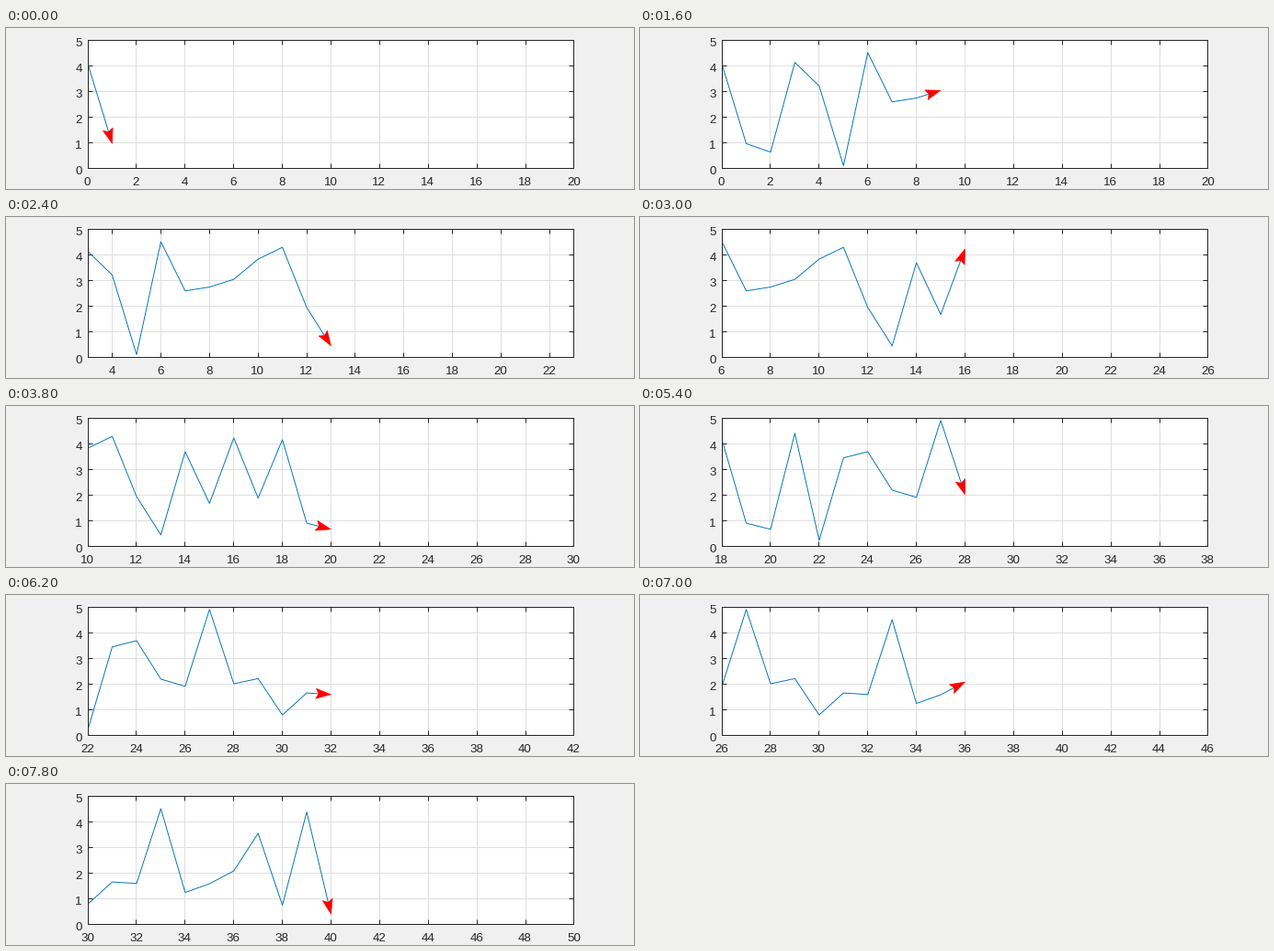
A matplotlib script that plays this animation: 683 px wide and 176 px high, repeating every 8000 ms.

```python
import numpy as np
import matplotlib.pyplot as plt
from matplotlib.animation import FuncAnimation
from matplotlib.patches import Polygon
from matplotlib.ticker import MultipleLocator
from matplotlib.transforms import IdentityTransform, ScaledTranslation

W, H, DPI = 683, 176, 100
PT = 72 / DPI                      # points per pixel
SPAN, LAG = 20, 10                 # window width, samples kept behind the tip
HEAD_LEN, HEAD_HALF, NOTCH = 16.5, 5.6, 3
INK = "#262626"

# vertices of the plotted signal, one per unit of x
signal = np.array([
    4.05, 0.95, 0.62, 4.12, 3.20, 0.09, 4.50, 2.58, 2.73, 3.03,
    3.82, 4.28, 1.93, 0.43, 3.68, 1.66, 4.22, 1.87, 4.15, 0.89,
    0.65, 4.40, 0.22, 3.44, 3.68, 2.18, 1.90, 4.90, 2.00, 2.20,
    0.78, 1.64, 1.58, 4.50, 1.23, 1.57, 2.07, 3.54, 0.73, 4.37,
    0.38])

plt.rcParams["font.family"] = "Liberation Sans"
plt.rcParams["toolbar"] = "None"

fig = plt.figure(figsize=(W / DPI, H / DPI), dpi=DPI, facecolor="#f0f0f0")
ax = fig.add_axes([88.6 / W, 23 / H, 528.8 / W, 140 / H])
ax.set_axisbelow(True)
ax.grid(True, color="#dfdfdf", linewidth=PT)
ax.tick_params(direction="in", top=True, right=True, length=5 * PT,
               width=PT, color=INK, labelcolor=INK, labelsize=13.33 * PT)
ax.tick_params(axis="x", pad=10 * PT)
ax.tick_params(axis="y", pad=5.8 * PT)
for spine in ax.spines.values():
    spine.set(color=INK, linewidth=PT)
ax.xaxis.set_major_locator(MultipleLocator(2))
ax.yaxis.set_major_locator(MultipleLocator(1))
ax.set_ylim(0, 5)

# y labels sit slightly below their grid lines
lower = ScaledTranslation(0, -2 / DPI, fig.dpi_scale_trans)
for label in ax.get_yticklabels():
    label.set_transform(label.get_transform() + lower)

line, = ax.plot([], [], color="#0072bd", linewidth=0.95 * PT,
                transform=IdentityTransform(), snap=False)
head = Polygon(np.zeros((4, 2)), facecolor="red", edgecolor="red",
               linewidth=0.5 * PT, transform=IdentityTransform(),
               clip_on=False, zorder=5)
ax.add_artist(head)


def arrow_head(tip, along):
    across = np.array([-along[1], along[0]]) * HEAD_HALF
    back = tip - along * HEAD_LEN
    return [tip, back + across, back + along * NOTCH, back - across]


def draw(i):
    last = i + 1
    start = max(0, last - LAG)
    ax.set_xlim(start, start + SPAN)

    x = np.arange(start, last + 1)
    # half a pixel aligns the data with the snapped grid lines
    pts = ax.transData.transform(np.column_stack([x, signal[x]])) + [0.5, 0]
    tip = pts[-1].copy()
    along = tip - pts[-2]
    along /= np.hypot(*along)
    head.set_xy(arrow_head(tip, along))
    pts[-1] = tip - along * HEAD_LEN / 2
    line.set_data(pts[:, 0], pts[:, 1])
    return line, head


anim = FuncAnimation(fig, draw, frames=len(signal) - 1, interval=200,
                     init_func=lambda: draw(0), repeat=True, repeat_delay=0)
plt.show()
```
